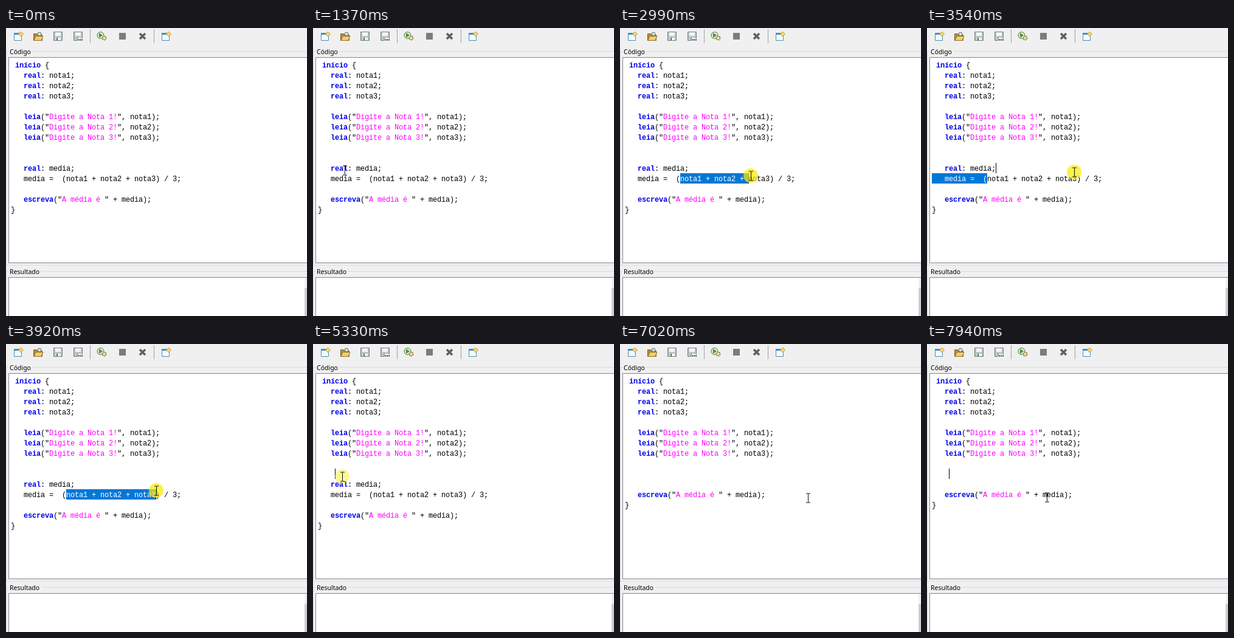
These frames come from a looping animation (495 by 474 pixels, 8 s). An HTML page:

```html
<!DOCTYPE html>
<html lang="pt">
<head>
<meta charset="utf-8">
<style>
html, body { margin: 0; width: 100%; height: 100%; overflow: hidden; background: #f0f0f0; }
body { position: relative; }
svg, .group, .box, .label, .line, #caret, #halo { position: absolute; box-sizing: border-box; }
svg { left: 0; top: 0; }
.group { left: 0; width: 500px; border: 1px solid #dcdcdc; }
.box { left: 4px; width: 500px; border: 1px solid #828790; background: #fff; }
.label { left: 4px; padding: 0 2px; background: #f0f0f0; color: #000;
  font: 10.5px/14px "Noto Sans", "Open Sans", sans-serif; }
.line { left: 8px; height: 17px; padding-top: 3px; white-space: pre; color: #000;
  font: 12px/14px "Liberation Mono", "Courier New", monospace; letter-spacing: -.2px; }
.line b { color: #00e; }
.line i { color: #f0f; font-style: normal; }
.sel, .sel * { color: #fff !important; }
.sel { background: #0078d7; }
#caret { width: 1px; height: 17px; background: #000; }
#halo { width: 24px; height: 24px; margin: -12px; border-radius: 50%; background: rgba(248, 236, 10, .72); }
</style>
</head>
<body>
<div class="group" style="top:38px;height:353px"></div>
<div class="group" style="top:400px;height:100px"></div>
<div class="box" style="top:48px;height:339px"></div>
<div class="box" style="top:410px;height:100px"></div>
<div class="label" style="top:32px">Código</div>
<div class="label" style="top:394px">Resultado</div>
<div id="code"></div>
<div id="caret"></div>
<div id="halo"></div>
<svg width="495" height="474" fill="none">
  <defs>
    <g id="window">
      <path d="M.5 2.5h12v12H.5z" fill="#f4fafd" stroke="#4a8fb5"/>
      <path d="M0 2h10v3H0z" fill="#3c8fc4"/>
      <path d="M11.500 0l4 4-4 4-4-4z" fill="#f7d774" stroke="#c89030"/>
    </g>
    <g id="disk">
      <path d="M.5 .5h14v14H.5z" fill="#b9c4c6" stroke="#6f7d82"/>
      <path d="M3 1h9v6H3zM4 10h8v4H4z" fill="#f4f6f6"/>
      <path d="M6 10v4" stroke="#59666a" stroke-width="2"/>
    </g>
  </defs>
  <use href="#window" x="13" y="6"/>
  <use href="#window" x="256" y="6"/>
  <g transform="translate(45 6)">
    <path d="M.5 14.500v-11h5l1 2h8v9z" fill="#b98a3c" stroke="#7d5c28"/>
    <path d="M1 14.500l3-7h12l-3 7z" fill="#f0cf6a" stroke="#94702c"/>
    <circle cx="10" cy="4" r="3" fill="#d8dedc" stroke="#5d6a6a"/>
  </g>
  <use href="#disk" x="78" y="6"/>
  <use href="#disk" x="111" y="6"/>
  <path d="M117 19.500h10" stroke="#f0f0f0" stroke-width="5"/>
  <path d="M118 19.500h8" stroke="#333" stroke-width="2" stroke-dasharray="2 1"/>
  <path d="M138.500 2v23M243.500 2v23" stroke="#a0a0a0"/>
  <circle cx="155.500" cy="12" r="5.500" fill="#dfead2" stroke="#4c7738"/>
  <path d="M153 8l6 4-6 4z" fill="#4f8f3a"/>
  <circle cx="161.500" cy="16.500" r="3" fill="#f3e9c0" stroke="#8c7c3c" stroke-width="2" stroke-dasharray="2 1"/>
  <path d="M186 8h11v11h-11z" fill="#7c7c7c"/>
  <path d="M220 9l9 9m0-9l-9 9" stroke="#606060" stroke-width="3.600"/>
  <path d="M491 411h4v17h-4z" fill="#f0f0f0"/>
  <path d="M491 428h4v46h-4z" fill="#cdcdcd"/>
  <path id="beam" d="M-3.500-7.500h7m0 15h-7M0-7v14" stroke="#111"/>
</svg>
<script>
const source = ` início {
   real: nota1;
   real: nota2;
   real: nota3;

   leia("Digite a Nota 1!", nota1);
   leia("Digite a Nota 2!", nota2);
   leia("Digite a Nota 3!", nota3);

    
   real: media;
   media =  (nota1 + nota2 + nota3) / 3;

   escreva("A média é " + media);
}`.split('\n');
const LEFT = 8, TOP = 52, COL = 7, ROW = 17, LOOP = 8000;
const DELETED = 6470, BLINK = 500, FADE = 150;

// the pointer glides to each stop and rests there until the next glide
const start = { x: 134, y: 0 };
const glides = [
  { from: 840, to: 1370, x: 52, y: 234 },
  { from: 1450, to: 2340, x: 99, y: 245 },
  { from: 2770, to: 2990, x: 215, y: 243 },
  { from: 3070, to: 3370, x: 237, y: 240 },
  { from: 3470, to: 3600, x: 245, y: 234 },
  { from: 3770, to: 3920, x: 247, y: 241 },
  { from: 4710, to: 5220, x: 48, y: 218 },
  { from: 5390, to: 5840, x: 302, y: 261 },
  { from: 5980, to: 6010, x: 309, y: 253 },
  { from: 7400, to: 7940, x: 197, y: 252 }
];
const drags = [{ press: 2340, release: 4320 }, { press: 5250, release: 5940 }];

const $ = id => document.getElementById(id);
const clamp = (v, lo, hi) => Math.max(lo, Math.min(hi, v));
const ramp = (t, from, to) => clamp((t - from) / (to - from), 0, 1);
const ease = k => k * k * (3 - 2 * k);
const paint = s => s.replace(/"(.*?)"/g, '"<i>$1</i>"').replace(/início|real|leia|escreva/g, '<b>$&</b>');

function addLine(text, cls) {
  const el = document.createElement('div');
  el.className = cls;
  el.innerHTML = paint(text);
  $('code').append(el);
  return el;
}
const lines = source.map(s => addLine(s, 'line'));
const marks = source.map(s => addLine(s, 'line sel'));
marks.forEach((el, i) => el.style.top = TOP + i * ROW + 'px');

function pointer(t) {
  let { x, y } = start;
  for (const g of glides) {
    const k = ease(ramp(t, g.from, g.to));
    x += (g.x - x) * k;
    y += (g.y - y) * k;
  }
  return [Math.round(x), Math.round(y)];
}

function textPos(t) {
  const [x, y] = pointer(t);
  const row = clamp(Math.floor((y - TOP) / ROW), 0, source.length - 1);
  return [row, clamp(Math.floor((x - LEFT) / COL), 0, source[row].length)];
}

function drawPointer(t, drag) {
  const [x, y] = pointer(t);
  $('beam').setAttribute('transform', `translate(${x + .5} ${y + .5})`);
  $('beam').style.opacity = t < glides[0].from ? 0 : 1;
  const glow = drag ? ramp(t, drag.press - 20, drag.press + FADE) * (1 - ramp(t, drag.release, drag.release + FADE)) : 0;
  $('halo').style.cssText = `left:${x}px;top:${y}px;opacity:${glow}`;
}

function drawCaret(t, drag, [row, col]) {
  const blinkedOff = t >= DELETED && Math.floor((t - DELETED - 20) / BLINK) % 2 === 1;
  $('caret').style.cssText = `left:${LEFT + col * COL}px;top:${TOP + row * ROW}px;opacity:${drag && !blinkedOff ? 1 : 0}`;
}

function drawLines(cut, from, to) {
  lines.forEach((el, i) => {
    const removed = cut && (i === 10 || i === 11);
    el.style.top = TOP + (cut && i > 11 ? i - 2 : i) * ROW + 'px';
    el.style.display = removed ? 'none' : '';
    const a = i === from[0] ? from[1] : 0, b = i === to[0] ? to[1] : source[i].length;
    marks[i].style.display = i >= from[0] && i <= to[0] && b > a ? '' : 'none';
    marks[i].style.clipPath = `inset(0 ${(source[i].length - b) * COL}px 0 ${a * COL}px)`;
  });
}

function draw(now) {
  const t = now % LOOP, cut = t >= DELETED;
  const drag = drags.filter(d => t >= d.press).pop();
  const anchor = drag ? textPos(drag.press) : [0, 0];
  // the released head settles with the pointer's last stop
  const head = !drag || cut ? anchor : textPos(Math.min(t, drag.release + FADE));
  const [from, to] = [anchor, head].sort((a, b) => a[0] - b[0] || a[1] - b[1]);
  drawPointer(t, drag);
  drawCaret(t, drag, head);
  drawLines(cut, from, to);
  requestAnimationFrame(draw);
}
requestAnimationFrame(draw);
</script>
</body>
</html>
```
